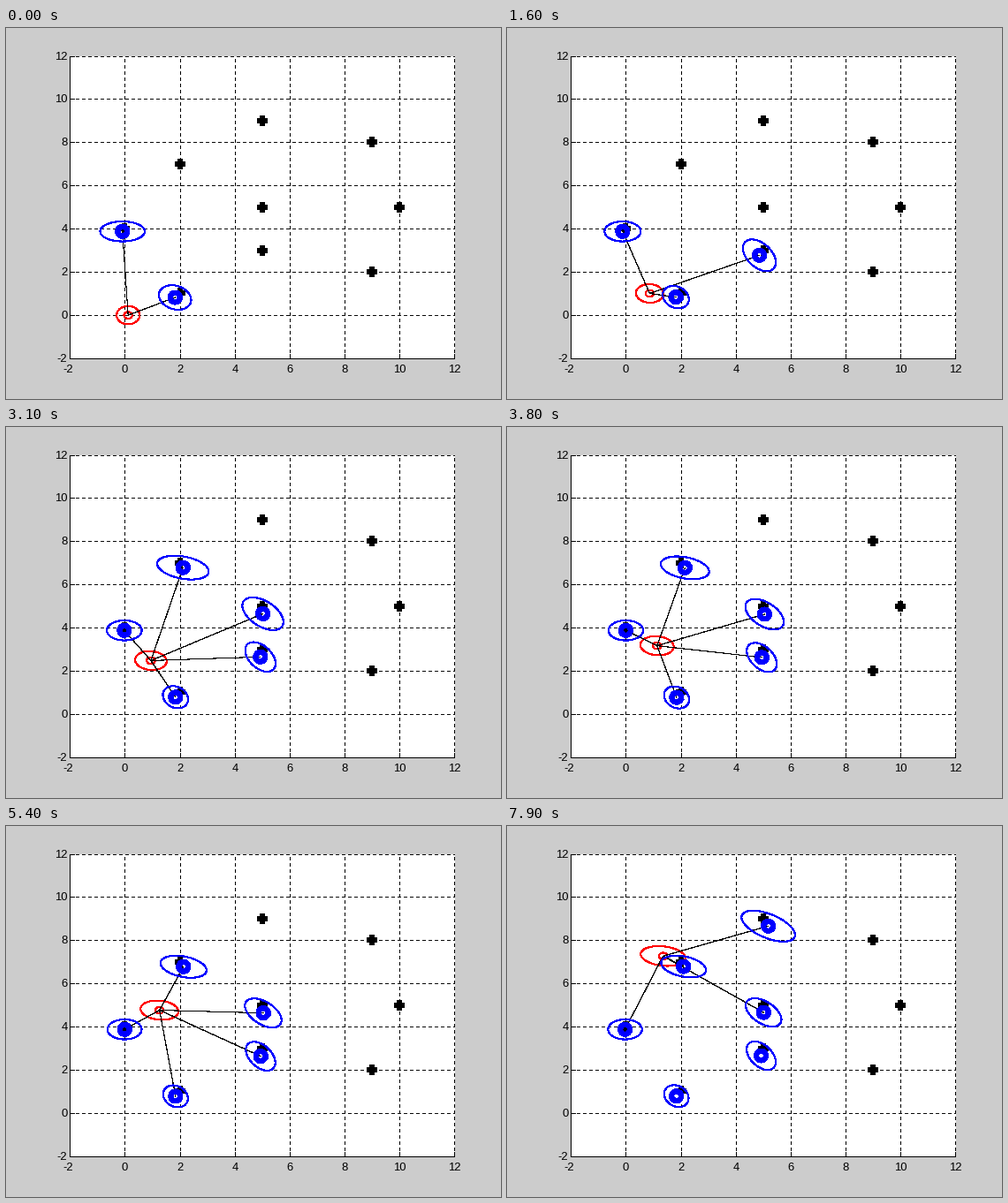
These frames come from a looping animation (560 by 420 pixels, 8 s). A matplotlib script:

```python
import numpy as np
import matplotlib.pyplot as plt
from matplotlib.animation import FuncAnimation

W, H, DPI = 560, 420, 100
FRAMES, STEP = 80, 100
PT = 72 / DPI
LEFT, RIGHT, TOP, BOTTOM = 72.25, 507.25, 31.5, 373.8
SENSOR_RANGE = 5

# Landmarks in sight at some time: x, y, settled half width and height, tilt
MAPPED = [(0, 4, 18.7, 11.3, 0), (2, 1, 13.5, 12.3, 0.2),
          (5, 3, 16, 15.7, 0.45), (5, 5, 19.5, 15.5, 0.5),
          (2, 7, 24.5, 12, 0.33), (5, 9, 27.5, 15.7, 0.57)]
UNSEEN = [(9, 8), (10, 5), (9, 2)]


def px(x):
    return LEFT + (x + 2) * (RIGHT - LEFT) / 14


def py(y):
    return BOTTOM - (y + 2) * (BOTTOM - TOP) / 14


# True robot path: a short turn, then steady driving with a slight weave.
k = np.arange(FRAMES)
path_x = (0.95 + 0.0035 * k - 0.72 * np.exp(-k / 6)
          - 0.1 * np.cos(2 * np.pi * (k - 46) / 19))
path_y = 0.1 * k - 0.45 + 0.58 * np.exp(-k / 2.5)

# The whole estimated map is slightly turned; the error drifts and jitters.
rng = np.random.default_rng(4)
turn = np.interp(k, [0, 16, 31, 46, 54, 79], [0.03, 0.025, 0.045, 0.06, 0.048, 0.047])
turn += rng.normal(0, 0.002, FRAMES)


def estimate(x, y, i):
    return px(x + turn[i] * y - 0.2), py(y - turn[i] * x - 0.13)


in_range = [np.hypot(path_x - m[0], path_y - m[1]) < SENSOR_RANGE for m in MAPPED]
first_seen = [int(np.argmax(seen)) for seen in in_range]

fig = plt.figure(figsize=(W / DPI, H / DPI), dpi=DPI, facecolor="#cccccc")
ax = fig.add_axes([0, 0, 1, 1])
ax.set_xlim(0, W)
ax.set_ylim(H, 0)
ax.axis("off")


def line(xs, ys, color="k", width=1.0, z=1, **kw):
    return ax.plot(xs, ys, color=color, lw=width * PT, zorder=z,
                   antialiased=False, **kw)[0]


def label(x, y, value, ha):
    ax.text(x, y, str(value), ha=ha, va="center", color="k",
            fontname="Liberation Sans", fontsize=13 * PT)


x0, x1, y0, y1 = (round(p) for p in (px(-2), px(12), py(-2), py(12)))
ax.add_patch(plt.Rectangle((x0, y1), x1 - x0 + 1, y0 - y1 + 1,
                           fc="w", lw=0, zorder=0))
for v in range(-2, 13, 2):
    x, y = round(px(v)), round(py(v))
    dots = dict(linestyle=(0, (3, 3)), dash_capstyle="butt")
    line([x, x], [y0, y1], **dots)
    line([x0, x1], [y, y], **dots)
    line([x, x], [y0, y0 - 5])
    line([x0, x0 + 5], [y, y])
    label(x - (2 if v < 0 else 0), 386.5, v, "center")
    label(69.5, y + 1.3, v, "right")
line([x0, x1], [y0, y0])
line([x0, x0], [y0, y1])

for u, v in [m[:2] for m in MAPPED] + UNSEEN:
    x, y = round(px(u)), round(py(v))
    for dx, dy in ((3, 0), (0, 3)):
        line([x - dx, x + dx], [y - dy, y + dy], width=6, z=2,
             solid_capstyle="round")

angle = np.linspace(0, 2 * np.pi, 61)


def ellipse(x, y, hx, hy, rho=0.0):
    c, s = np.cos(angle), np.sin(angle)
    return x + hx * c, y + hy * (rho * c + np.sqrt(1 - rho * rho) * s)


# Hard-edged strokes fill every pixel they touch, hence the thin widths.
body = line([], [], "r", 1.1, 3)
body_rim = line([], [], "r", 1.1, 3)
rays = [line([], [], width=0.1, z=4) for _ in MAPPED]
rings = [line([], [], "b", 5.2, 5) for _ in MAPPED]
rims = [line([], [], "b", 1.1, 5) for _ in MAPPED]


def draw(i):
    rx, ry = estimate(path_x[i], path_y[i], i)
    body.set_data(*ellipse(rx, ry, 4.7, 3.8))
    body_rim.set_data(*ellipse(rx, ry, 13 + 0.155 * i, 10.3 + 0.012 * i, 0.0025 * i))
    for j, (u, v, hx, hy, rho) in enumerate(MAPPED):
        age = i - first_seen[j]
        for part in (rings[j], rims[j]):
            part.set_visible(age >= 0)
        rays[j].set_visible(bool(in_range[j][i]))
        if age >= 0:
            x, y = estimate(u, v, i)
            grow = 1 + 0.35 / (1 + age / 6)
            rays[j].set_data([rx, x], [ry, y])
            rings[j].set_data(*ellipse(x, y, 5.4, 5.4))
            rims[j].set_data(*ellipse(x, y, hx * grow, hy * grow ** (2 * rho), rho))
    return [body, body_rim, *rays, *rings, *rims]


anim = FuncAnimation(fig, draw, frames=FRAMES, interval=STEP, repeat=True,
                     repeat_delay=0)
plt.show()
```
